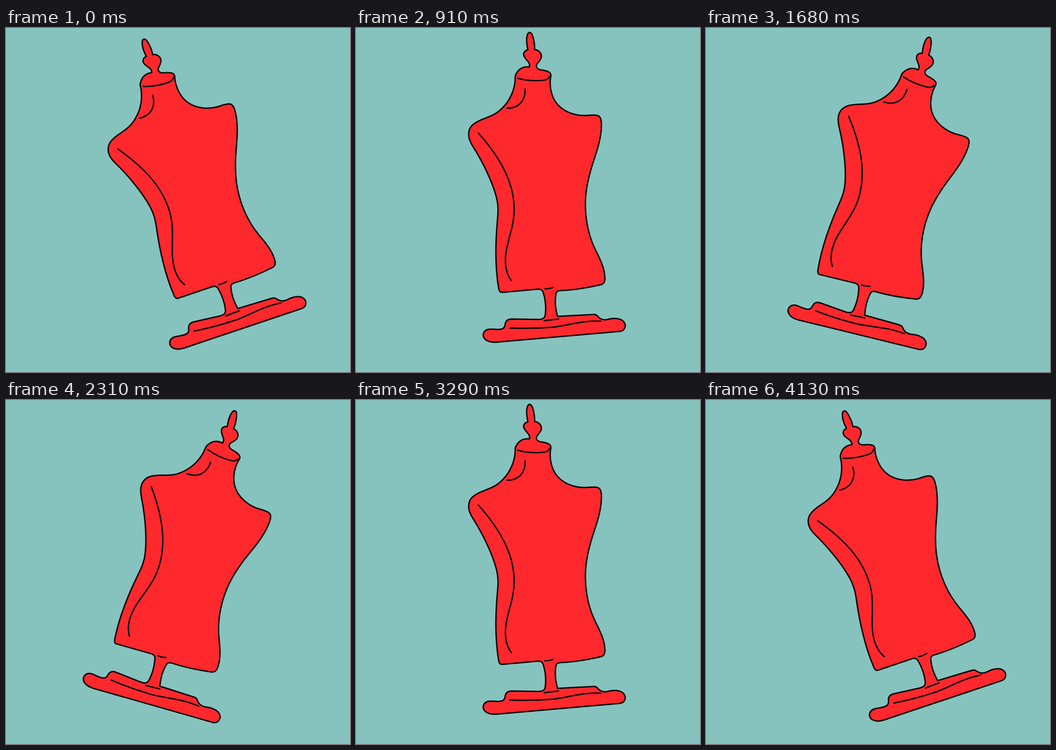
Recreate the animation shown at these times as an HTML page. Size 748 by 748 pixels, loop 4.2 s.

```html
<!DOCTYPE html>
<html lang="en">
<head>
<meta charset="utf-8">
<title>Swinging dress form</title>
<style>
  html, body { margin: 0; height: 100%; overflow: hidden; background: #86c3be; }
  svg { display: block; width: 100%; height: 100%; }
  path { fill: none; stroke: #080808; stroke-width: 3; stroke-linecap: round; stroke-linejoin: round; }
  .body { fill: #ff282c; }
</style>
</head>
<body>
<svg viewBox="0 0 748 748">
  <g id="form">
    <path class="body" d="M319 58C327 56 337 62 337 71C337 80 331 84 331 90C331 95 336 98 342 97.5
      C350 97 358 96 363 99C368 102 367 106 367 109C369 130 380 152 397 163C415 175 440 177 461 171
      C470 168 478 165 485 165C493 165 496 172 498 180C505 205 503 235 501 258C498 290 498 310 501 335
      C507 380 525 420 550 450C565 468 580 485 585 507C586 514 585 518 579 521C555 533 525 546 497 554
      C491 556 489 558 489 563C490 580 496 596 504 610L577 588C583 586 586 587 590 590
      C597 595 603 594 609 592C617 588 625 584 635 584C645 584 652 590 652 598C652 605 648 609 640 611
      L387 696C380 698 375 698.5 371 698C362 697 356 692 356 685C356 678 361 673 369 671
      C378 669 388 669 394 664C399 660 397 655 397 651C397 645 401 641 408 639L466 626
      C475 623 478 620 477 612C475 596 469 580 462 568C459 562 455 561 450 562L376 587
      C371 589 369 588 366 583C345 535 334 480 328 440C325 418 322 405 314 390
      C297 358 265 320 238 294C228 284 222 275 222 263C222 250 232 241 244 232
      C262 220 273 213 284 192C294 173 297 150 293 130C291 124 291 121 293 117
      C296 105 306 98 317 97C317 92 314 88 309 85C302 80 297 76 298 70C299 65 302 63 305 62
      C300 52 296 42 296 32C296 27 298 24 301 24C307 24 317 46 319 58Z"/>
    <path d="M298 127C320 128 340 123 354 118C361 115 364 112 364 107"/>
    <path d="M319 146C326 170 316 190 291 196"/>
    <path d="M243 263C300 303 340 345 356 400C366 435 360 465 362 498C364 525 372 545 388 558"/>
    <path d="M463 558C470 557 475 554 480 551"/>
    <path d="M478 626L507 615"/>
    <path d="M409 659C440 653 470 645 500 635C530 624 560 605 598 598"/>
  </g>
</svg>
<script>
  const form = document.getElementById('form');
  const LOOP = 4200, STEP = 70, SWING = 35.2;

  // cubic-bezier(.42, 0, .58, 1), solved by bisection
  function easeInOut(x) {
    let lo = 0, hi = 1, s = 0.5;
    for (let i = 0; i < 24; i++) {
      s = (lo + hi) / 2;
      const bx = 3 * s * (1 - s) ** 2 * 0.42 + 3 * s * s * (1 - s) * 0.58 + s ** 3;
      if (bx < x) lo = s; else hi = s;
    }
    return s * s * (3 - 2 * s);
  }

  function draw() {
    const t = Math.floor(performance.now() % LOOP / STEP) * STEP;
    const phase = 1 - Math.abs(1 - 2 * t / LOOP);
    form.setAttribute('transform', `rotate(${SWING * easeInOut(phase)} 399.5 343.4)`);
    requestAnimationFrame(draw);
  }
  draw();
</script>
</body>
</html>
```
